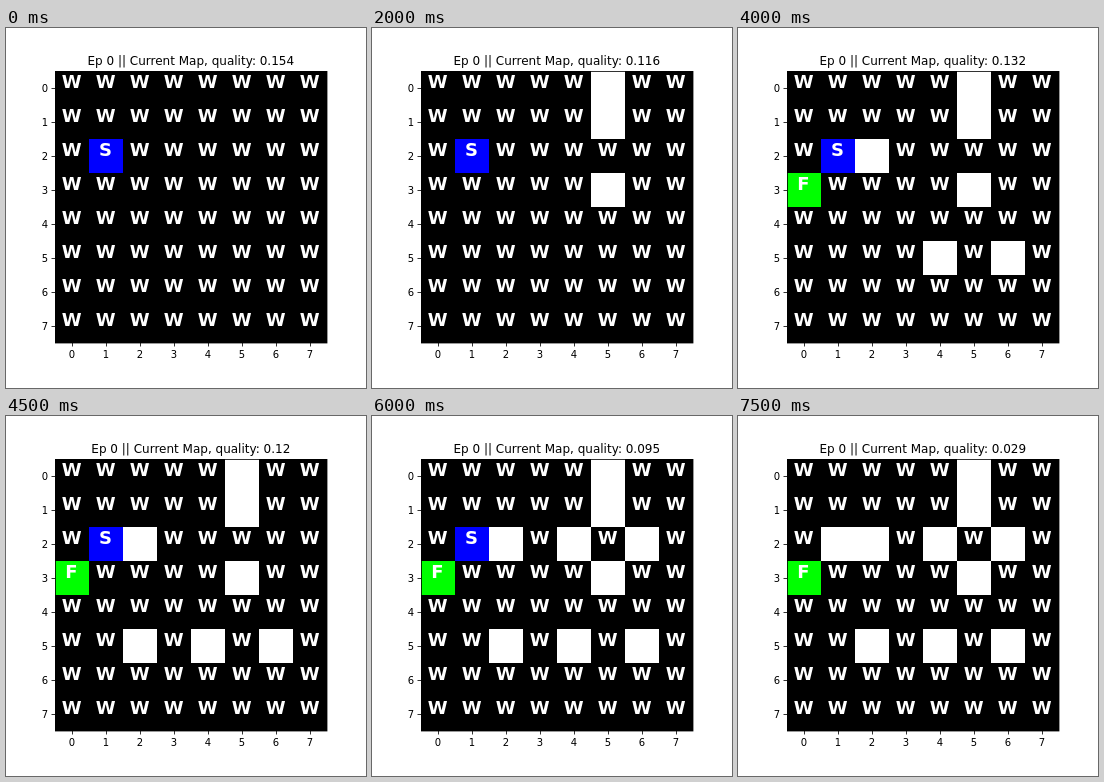
Animation of 360 by 360 pixels, one loop 8000 ms. Source, as an HTML page:

```html
<!DOCTYPE html>
<html lang="en">
<head>
<meta charset="utf-8">
<title>Map editing</title>
<style>
  html, body { margin: 0; width: 100%; height: 100%; overflow: hidden; background: #fff; }
  svg { display: block; width: 100vw; height: 100vh; }
  text { font-family: "DejaVu Sans", sans-serif; text-anchor: middle; }
  .title { font-size: 12px; }
  .tick { font-size: 10px; }
  .mark { font-size: 18px; font-weight: bold; fill: #fff; }
  .axis { fill: none; stroke: #000; stroke-width: 0.8; }
</style>
</head>
<body>
<svg id="stage" viewBox="0 0 360 360"></svg>
<script>
const SIZE = 8, CELL = 34, LEFT = 49, TOP = 43;
const STEP = 500, LOOP = 8000;
const COLORS = { W: '#000', S: '#00f', F: '#0f0', E: '#fff' };

// Each edit: time in ms, column, row, new tile, resulting quality
const EDITS = [
  [1000, 5, 1, 'E', '0.141'],
  [1500, 5, 0, 'E', '0.128'],
  [2000, 5, 3, 'E', '0.116'],
  [2500, 4, 5, 'E', '0.104'],
  [3000, 0, 3, 'F', '0.157'],
  [3500, 2, 2, 'E', '0.145'],
  [4000, 6, 5, 'E', '0.132'],
  [4500, 2, 5, 'E', '0.12'],
  [5000, 6, 2, 'F', '-0.892'],
  [5500, 4, 2, 'E', '-0.905'],
  [6000, 6, 2, 'E', '0.095'],
  [6500, 1, 2, 'E', '0.029'],
  [7000, 1, 2, 'F', '-0.918'],
  [7500, 1, 2, 'E', '0.029']
];

const stage = document.getElementById('stage');

function add(tag, attrs, content = '') {
  const node = document.createElementNS('http://www.w3.org/2000/svg', tag);
  for (const key in attrs) node.setAttribute(key, attrs[key]);
  node.textContent = content;
  return stage.appendChild(node);
}

const center = (origin, i) => origin + CELL * (i + 0.5);

const title = add('text', { class: 'title', x: 184.8, y: 37 });
const cells = [];
for (let i = 0; i < SIZE * SIZE; i++) {
  const col = i % SIZE, row = Math.floor(i / SIZE);
  const rect = add('rect', {
    x: LEFT + col * CELL, y: TOP + row * CELL,
    width: CELL, height: CELL, 'shape-rendering': 'crispEdges'
  });
  const mark = add('text', { class: 'mark', y: center(TOP, row) });
  cells.push({ rect, mark, x: center(LEFT, col) });
}

const edge = SIZE * CELL;
add('rect', { class: 'axis', x: LEFT + 0.5, y: TOP + 0.5, width: edge - 0.5, height: edge - 0.5 });
for (let i = 0; i < SIZE; i++) {
  const x = center(LEFT, i), y = center(TOP, i);
  add('path', { class: 'axis', d: `M${x + 0.5} ${TOP + edge}v3.5M${LEFT} ${y + 0.5}h-3.5` });
  add('text', { class: 'tick', x, y: 330 }, i);
  add('text', { class: 'tick', x: 39, y: y + 4 }, i);
}

function draw(time) {
  const tiles = Array(SIZE * SIZE).fill('W');
  tiles[2 * SIZE + 1] = 'S';
  let quality = '0.154';
  for (const [at, col, row, tile, value] of EDITS) {
    if (at > time) break;
    tiles[row * SIZE + col] = tile;
    quality = value;
  }
  title.textContent = `Ep 0 || Current Map, quality: ${quality}`;
  cells.forEach(({ rect, mark, x }, i) => {
    const tile = tiles[i];
    rect.setAttribute('fill', COLORS[tile]);
    mark.setAttribute('x', tile === 'W' ? x - 0.2 : x - 0.5);
    mark.textContent = tile === 'E' ? '' : tile;
  });
}

let shown = -1;
function tick() {
  const step = Math.floor(performance.now() % LOOP / STEP);
  if (step !== shown) draw((shown = step) * STEP);
  requestAnimationFrame(tick);
}
tick();
</script>
</body>
</html>
```
